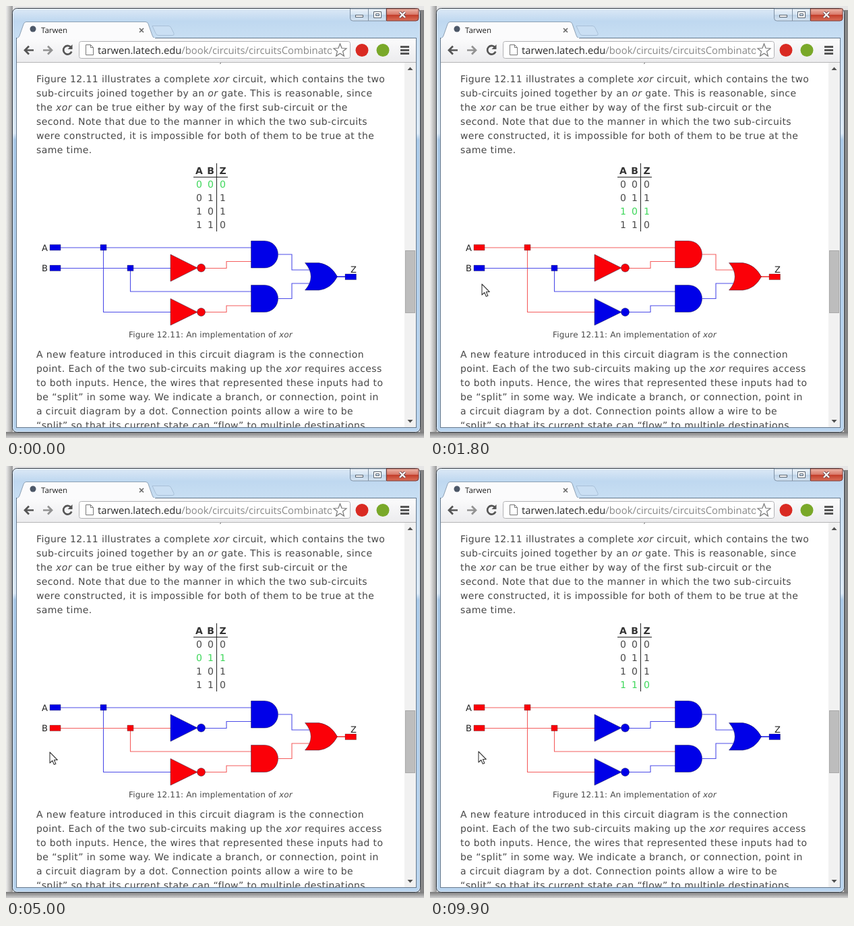
An HTML page that plays this animation: 620 px wide and 640 px high, repeating every 10000 ms.

```html
<!DOCTYPE html>
<html lang="en">
<head>
<meta charset="utf-8">
<title>Circuit demo</title>
<style>
html, body { margin: 0; width: 100%; height: 100%; overflow: hidden; background: #fff; }
svg { display: block; width: 620px; height: 640px; text-rendering: geometricPrecision; }
text { white-space: pre; }
.ui { font-family: "Open Sans", "Noto Sans", sans-serif; }
.page { font: 14px "DejaVu Sans", Verdana, sans-serif; fill: #484848; }
.prose { letter-spacing: .4px; }
.caption { font-size: 12px; letter-spacing: .18px; }
.label { font-size: 13px; fill: #222; }
.head { font-weight: bold; fill: #333; }
.mid { text-anchor: middle; }
.it { font-style: italic; }
.on { fill: #3dd75a; }
.sig { --body: #0000e8; --wire: #4c4ce8; }
.sig.hi { --body: #fb0008; --wire: #f45e5e; }
.sig .w { fill: none; stroke: var(--wire); stroke-width: 1.1; }
.sig .b { fill: var(--body); stroke: #14143c; stroke-opacity: .65; stroke-width: .7; }
.sig .d { fill: var(--body); stroke: #222; stroke-opacity: .65; stroke-width: .5; }
.cursor { fill: #fff; stroke: #3a3a3a; stroke-width: 1.1; stroke-linejoin: round; }
</style>
</head>
<body>
<svg viewBox="0 0 620 640">
  <defs>
    <linearGradient id="frame" x2="0" y2="1">
      <stop offset="0" stop-color="#dce9f6"/>
      <stop offset=".03" stop-color="#bfd8f0"/>
      <stop offset=".06" stop-color="#c6ddf2"/>
      <stop offset=".295" stop-color="#dceaf7"/>
      <stop offset=".31" stop-color="#a9c9e8"/>
      <stop offset="1" stop-color="#b9d4ee"/>
    </linearGradient>
    <linearGradient id="left"><stop stop-color="#ededed"/><stop offset="1" stop-color="#969696"/></linearGradient>
    <linearGradient id="bottom" x2="0" y2="1"><stop stop-color="#777"/><stop offset="1" stop-color="#d2d2d2"/></linearGradient>
    <linearGradient id="close" x2="0" y2="1">
      <stop stop-color="#eeb8aa"/><stop offset=".48" stop-color="#d9796a"/>
      <stop offset=".5" stop-color="#c33c28"/><stop offset="1" stop-color="#d9705a"/>
    </linearGradient>
    <linearGradient id="glass" x2="0" y2="1">
      <stop stop-color="#eef4fa"/><stop offset=".48" stop-color="#d5e4f2"/>
      <stop offset=".5" stop-color="#bdd2e7"/><stop offset="1" stop-color="#d6e5f3"/>
    </linearGradient>
    <linearGradient id="bar" x2="0" y2="1"><stop stop-color="#fbfbfc"/><stop offset="1" stop-color="#ececee"/></linearGradient>
    <clipPath id="view"><rect x="16" y="84" width="575" height="540"/></clipPath>
    <clipPath id="address"><rect x="110" y="53" width="373" height="24"/></clipPath>
  </defs>

  <!-- Window frame -->
  <rect width="620" height="640" fill="#e6e6e6"/>
  <rect width="10" height="640" fill="url(#left)"/>
  <rect x="614" y="6" width="6" height="634" fill="#858585"/>
  <rect y="631" width="620" height="9" fill="url(#bottom)"/>
  <rect x="9.5" y="3.5" width="605" height="628" rx="7" fill="url(#frame)" stroke="#2d3640"/>
  <rect x="10.5" y="4.5" width="603" height="626" rx="6" fill="none" stroke="#fff" stroke-opacity=".55"/>
  <g stroke="#7f91a4">
    <path d="M510.5 4V18q0 4 4 4H564V4Z" fill="url(#glass)"/>
    <path d="M537.5 4V22"/>
    <path d="M564.5 4V22H608q4 0 4-4V4Z" fill="url(#close)" stroke="#7a3a34"/>
  </g>
  <g fill="#fff" stroke="#59636e">
    <rect x="518.5" y="13.5" width="11" height="3"/>
    <path d="M545.5 8.5h11v9h-11zM548.5 11.5h5v3h-5z" fill-rule="evenodd"/>
  </g>
  <path d="M584 9l8 8m0-8l-8 8" stroke="#684348" stroke-width="4"/>
  <path d="M584 9l8 8m0-8l-8 8" stroke="#fff" stroke-width="2.4"/>

  <!-- Tab strip and toolbar -->
  <path d="M217 29.5h24q3 0 4 3l4 8q1 3-2 3h-21q-3 0-4-3z" fill="#cadff3" stroke="#a9c0d8"/>
  <rect x="15.5" y="47.5" width="593" height="577" fill="#fff" stroke="#66798d"/>
  <rect x="16" y="48" width="592" height="35" fill="url(#bar)"/>
  <path d="M16 48q3-1 4-4l6-17q1-3.5 4-3.5H207q3 0 4 3l6 17q1 4 5 4.5" fill="#fbfbfc" stroke="#8da1b5"/>
  <rect x="17" y="47" width="204" height="2" fill="#fbfbfc"/>
  <path d="M16 83.5h592" stroke="#b4b4b6"/>
  <circle cx="40" cy="34" r="4.5" fill="#4d5868"/>
  <text class="ui" x="52" y="40" font-size="11.5" fill="#222">Tarwen</text>
  <path d="M198 33l6 6m0-6l-6 6" stroke="#666" stroke-width="1.6"/>
  <g fill="none" stroke="#555" stroke-width="2.7">
    <path d="M41 65.5H28m6-6l-6 6 6 6"/>
    <path d="M55 65.5H68m-6-6l6 6-6 6" stroke="#929292"/>
    <path d="M96.5 61.5a6.3 6.3 0 1 0 .8 6"/>
    <path d="M98.5 57v7h-7z" fill="#555" stroke="none"/>
  </g>
  <rect x="108.5" y="52.5" width="402" height="25" rx="3" fill="#fff" stroke="#b1b1b4"/>
  <path d="M118.5 57.5h7l4 4v11h-11zM125.5 57.5v4h4" fill="#fff" stroke="#777"/>
  <g clip-path="url(#address)">
    <text class="ui" x="136" y="70.5" font-size="14.8" fill="#888"><tspan fill="#2b2b2b">tarwen.latech.edu</tspan>/book/circuits/circuitsCombinatorial</text>
  </g>
  <path id="star" fill="#fff" stroke="#777" stroke-width="1.2"/>
  <circle cx="528" cy="65.5" r="9.5" fill="#d92a22"/>
  <circle cx="559" cy="65.5" r="9.5" fill="#79a829"/>
  <path d="M585 60.5h13m-13 5h13m-13 5h13" stroke="#555" stroke-width="2.8"/>

  <!-- Scrollbar -->
  <rect x="591" y="84" width="17" height="540" fill="#f1f1f1"/>
  <rect x="592.5" y="362.5" width="14" height="92" fill="#bdbdbd" stroke="#a9a9a9"/>
  <path d="M595.5 95l4-4.5 4 4.5zM595.5 613l4 4.5 4-4.5z" fill="#505050"/>

  <!-- Page -->
  <g class="page" clip-path="url(#view)">
    <path d="M319 83l-1.5 3" stroke="#666"/>
    <g id="prose" class="prose"></g>
    <text class="caption" x="182" y="491">Figure 12.11: An implementation of <tspan class="it">xor</tspan></text>
    <g id="table"></g>
    <path d="M312.5 233V334M278 253.5H329" stroke="#222"/>

    <g class="sig" data-s="a">
      <path class="w" d="M81 358H364M144.5 358V453.5H244"/>
      <path class="d" d="M65 353.5h16v8.5h-16zM140 353.5h9v8.5h-9z"/>
    </g>
    <g class="sig" data-s="b">
      <path class="w" d="M81 388.5H244M184.5 388V423H364"/>
      <path class="d" d="M65 384h16v8.5h-16zM180 384h9v8.5h-9z"/>
    </g>
    <g class="sig" data-s="notB">
      <path class="w" d="M295 388.5H327V378.5H364"/>
      <path class="b" d="M244 368L284 388 244 408Z"/><circle class="b" cx="289.5" cy="388" r="6"/>
    </g>
    <g class="sig" data-s="notA">
      <path class="w" d="M295 453.5H327V444H364"/>
      <path class="b" d="M244 433.5L284 453.5 244 473Z"/><circle class="b" cx="289.5" cy="453.5" r="6"/>
    </g>
    <g class="sig" data-s="and1">
      <path class="w" d="M404 368H424V391H450"/>
      <path class="b" d="M363.5 348h20a20 20 0 0 1 0 40h-20z"/>
    </g>
    <g class="sig" data-s="and2">
      <path class="w" d="M404 433.5H424V411H450"/>
      <path class="b" d="M363.5 413.5h20a20 20 0 0 1 0 40h-20z"/>
    </g>
    <g class="sig" data-s="z">
      <path class="w" d="M491 401H504" style="stroke-width:2"/>
      <path class="b" d="M443.5 380.5H464Q482 383 491.5 401Q482 419 464 421H443.5Q461 401 443.5 380.5Z"/>
      <path class="d" d="M503 397h16.5v8.5H503z"/>
    </g>
    <text class="label" x="53" y="362.5">A</text>
    <text class="label" x="53" y="392.5">B</text>
    <text class="label" x="511" y="395">Z</text>
  </g>

  <circle id="ring" r="13.5" fill="none" stroke="#96a4d8" stroke-width="2.8" opacity=".7"/>
  <g id="cursor" class="cursor">
    <path id="arrow" d="M0 0V16L3.8 12.5 6.3 18.3 8.9 17.2 6.4 11.5H11.3Z"/>
    <path id="hand" transform="translate(-1.5 -1)" d="M-1.5 1.5Q0-1.5 1.7 1.5V7Q4 5.5 5 8Q7.3 7 8.2 9Q11 8.3 11.3 11V15Q10.5 18 9 20V22H0V20L-5 13Q-6.5 10-4.5 9.5Q-3 9.5-1.5 12ZM1.7 7V11M5 8V11.5M8.2 9V12"/>
  </g>
</svg>
<script>
const $ = id => document.getElementById(id);
const LOOP = 10000, STEP = 100;

const italic = s => s.replace(/\*(.+?)\*/g, '<tspan class="it">$1</tspan>');
const lines = (rows, y) => rows.map((s, i) =>
  `<text x="45" y="${y + i * 21}">${italic(s)}</text>`).join('');

$('prose').innerHTML = lines([
  'Figure 12.11 illustrates a complete *xor* circuit, which contains the two',
  'sub-circuits joined together by an *or* gate. This is reasonable, since',
  'the *xor* can be true either by way of the first sub-circuit or the',
  'second. Note that due to the manner in which the two sub-circuits',
  'were constructed, it is impossible for both of them to be true at the',
  'same time.'
], 112.5) + lines([
  'A new feature introduced in this circuit diagram is the connection',
  'point. Each of the two sub-circuits making up the *xor* requires access',
  'to both inputs. Hence, the wires that represented these inputs had to',
  'be “split” in some way. We indicate a branch, or connection, point in',
  'a circuit diagram by a dot. Connection points allow a wire to be',
  '“split” so that its current state can “flow” to multiple destinations.'
], 521);

$('table').innerHTML = ['ABZ', '000', '011', '101', '110'].map((row, i) =>
  `<g class="mid ${i ? 'row' : 'head'}">` + [...row].map((c, k) =>
    `<text x="${[286.5, 303.5, 321.5][k]}" y="${248.5 + i * 20 + (i ? .7 : 0)}">${c}</text>`
  ).join('') + '</g>').join('');

$('star').setAttribute('d', 'M' + Array.from({length: 10}, (_, i) => {
  const r = i % 2 ? 4.3 : 10, a = (i / 5 - .5) * Math.PI;
  return `${(495.5 + r * Math.cos(a)).toFixed(1)} ${(66 + r * Math.sin(a)).toFixed(1)}`;
}).join('L') + 'Z');

// Pointer path: time, x, y
const path = [
  [200, 112, 640], [800, 75, 364], [1300, 75, 364], [1700, 77, 412], [2200, 77, 412],
  [2500, 74, 361], [3000, 74, 361], [3300, 75, 388], [4200, 75, 388], [4700, 65, 424],
  [5300, 65, 424], [5700, 74, 388], [6200, 74, 388], [6600, 72, 428], [6900, 72, 428],
  [7300, 73, 362], [7800, 73, 362], [8000, 74, 388], [8600, 74, 388], [9100, 72, 423],
  [LOOP, 72, 423]
];
// Clicks: time and toggled input
const clicks = [[1200, 'a'], [2800, 'a'], [4000, 'b'], [5900, 'b'], [7700, 'a'], [8400, 'b']];
const RING = 500;

function pointAt(t) {
  const n = Math.max(1, path.findIndex(p => p[0] >= t));
  const [t0, x0, y0] = path[n - 1], [t1, x1, y1] = path[n];
  const u = Math.min(1, Math.max(0, (t - t0) / (t1 - t0))), e = u * u * (3 - 2 * u);
  return [x0 + (x1 - x0) * e, y0 + (y1 - y0) * e];
}

const overInput = (x, y) =>
  x >= 64 && x <= 82 && (Math.abs(y - 358) < 7 || Math.abs(y - 388) < 6);
const show = (el, on) => el.style.display = on ? '' : 'none';

function draw(t) {
  const input = {a: false, b: false};
  let last = null;
  for (const [at, key] of clicks) if (t >= at) { input[key] = !input[key]; last = at; }

  const {a, b} = input;
  const state = {a, b, notA: !a, notB: !b, and1: a && !b, and2: b && !a, z: a !== b};
  document.querySelectorAll('.sig').forEach(g => g.classList.toggle('hi', state[g.dataset.s]));
  document.querySelectorAll('.row').forEach((g, i) => g.classList.toggle('on', i === 2 * a + 1 * b));

  const [x, y] = pointAt(t), hand = overInput(x, y);
  $('cursor').setAttribute('transform', `translate(${x} ${y})`);
  show($('cursor'), t >= path[0][0]);
  show($('hand'), hand);
  show($('arrow'), !hand);

  const ringing = last !== null && t - last < RING;
  show($('ring'), ringing);
  if (ringing) {
    const [cx, cy] = pointAt(last);
    $('ring').setAttribute('cx', cx);
    $('ring').setAttribute('cy', cy);
  }
}

const start = performance.now();
function tick() {
  const t = (performance.now() - start) % LOOP;
  draw(Math.floor(t / STEP) * STEP);
  requestAnimationFrame(tick);
}
tick();
</script>
</body>
</html>
```
